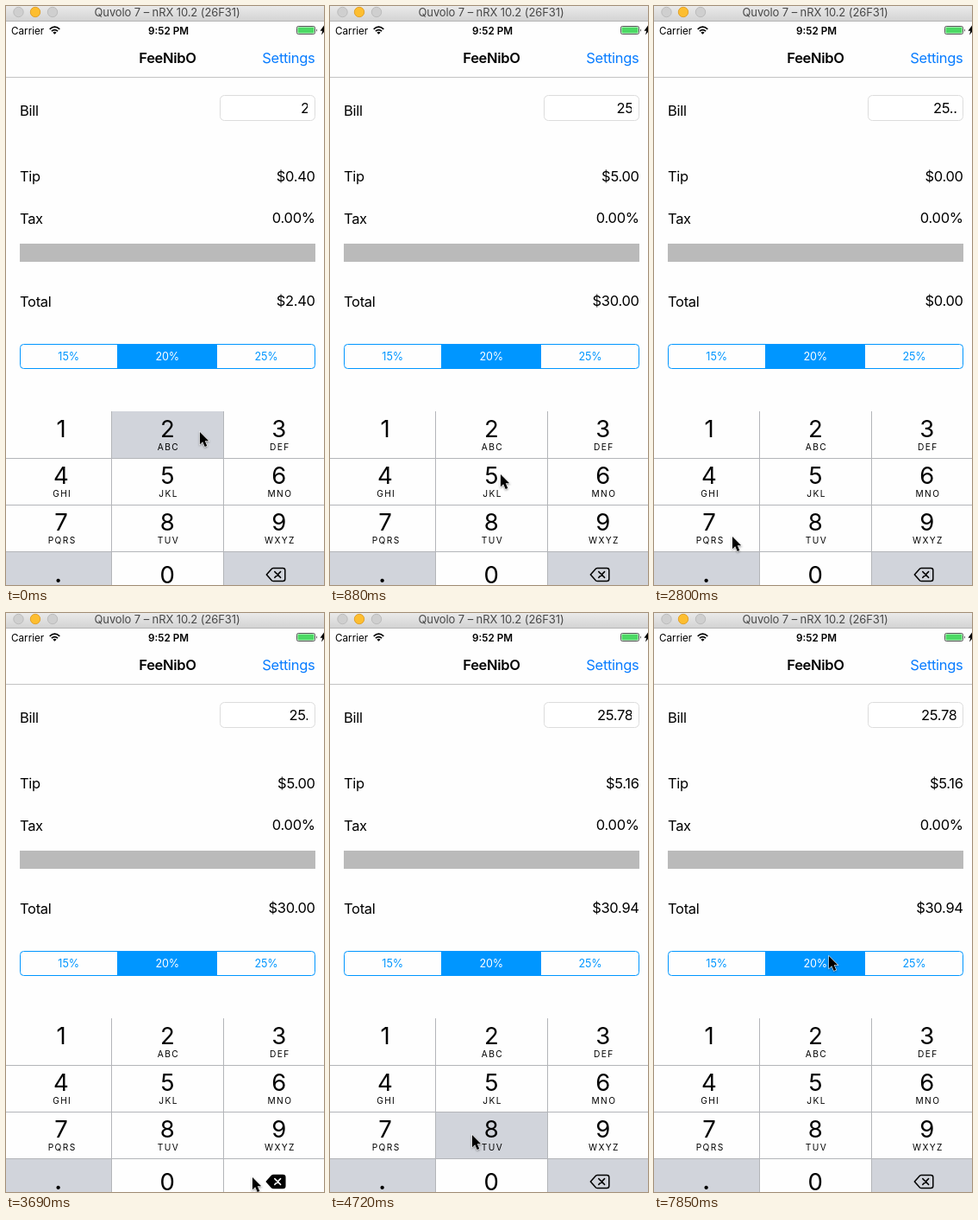
An HTML page for the animation above (8 s loop, 369x670 px).

```html
<!DOCTYPE html>
<html lang="en">
<head>
<meta charset="utf-8">
<title>Tip calculator</title>
<style>
  html, body { margin: 0; width: 100%; height: 100%; overflow: hidden; background: #fefefe; }
  svg { display: block; }
  text { font: 16.5px Inter, "Open Sans", sans-serif; letter-spacing: -.3px; white-space: pre; }
  .end { text-anchor: end; }
  .mid, .digit, .letters, .seg { text-anchor: middle; }
  .bar { font-size: 13px; letter-spacing: -.1px; fill: #474747; }
  .status { font-size: 11.7px; letter-spacing: 0; }
  .bold { font-weight: 600; }
  .seg { font-size: 12.6px; letter-spacing: -.1px; fill: #0096ff; }
  .digit { font-size: 27.5px; letter-spacing: 0; }
  .letters { font-size: 10.2px; letter-spacing: 1.4px; }
  #arrow { filter: drop-shadow(0 1px 1px #0006); }
</style>
</head>
<body>
<svg width="369" height="670" viewBox="0 0 369 670">
  <defs>
    <linearGradient id="chrome" x2="0" y2="1">
      <stop stop-color="#eaeaea"/><stop offset="1" stop-color="#d2d2d2"/>
    </linearGradient>
  </defs>

  <!-- window bar -->
  <rect width="369" height="18" fill="url(#chrome)"/>
  <path d="M0 17.5H369" stroke="#b5b5b5"/>
  <g fill="#cfcfcf" stroke="#bcbcbc">
    <circle cx="14.5" cy="7" r="5.7"/>
    <circle cx="34" cy="7" r="5.7" fill="#fdbe30" stroke="#e2a22c"/>
    <circle cx="54" cy="7" r="5.7"/>
  </g>
  <text class="bar mid" x="187" y="12">Quvolo 7 – nRX 10.2 (26F31)</text>

  <!-- status bar -->
  <text class="status" x="6" y="32.5">Carrier</text>
  <g fill="none" stroke="#000" stroke-width="1.7">
    <path d="M50.7 26.8Q56.5 21.6 62.3 26.8M52.9 29.2Q56.5 26 60.1 29.2"/>
    <path d="M56.5 32.8L54.4 30.7Q56.5 29 58.6 30.7Z" fill="#000" stroke="none"/>
  </g>
  <text class="status bold mid" x="188.5" y="32.5">9:52 PM</text>
  <rect x="337.5" y="23.5" width="21" height="9" rx="1.8" fill="#fff" stroke="#555"/>
  <rect x="338.5" y="24.5" width="19" height="7" rx="1" fill="#4cd964"/>
  <path d="M360 26.3q1.6 1.7 0 3.6z"/>
  <path d="M369 22.5L364.5 28.8H367.2L366 33.5L369 30Z"/>

  <!-- navigation -->
  <text class="bold mid" x="187.5" y="66">FeeNibO</text>
  <text class="end" x="358.5" y="66" fill="#087cff">Settings</text>
  <path d="M0 82.5H369" stroke="#c4c4c4"/>

  <!-- form -->
  <text x="16" y="126.5">Bill</text>
  <text x="16" y="202.5">Tip</text>
  <text x="16" y="251.5">Tax</text>
  <text x="16" y="347.5">Total</text>
  <rect x="248.5" y="103.5" width="110" height="29" rx="5" fill="#fff" stroke="#dcdcdc"/>
  <text class="end" id="bill" x="351.7" y="124"></text>
  <rect id="caret" x="350" y="109" width="2" height="18" fill="#fff"/>
  <text class="end" id="tip" x="358.7" y="202.5"></text>
  <text class="end" x="358.7" y="250.5">0.00%</text>
  <rect x="16" y="275" width="343" height="21" fill="#bababa"/>
  <text class="end" id="total" x="358.7" y="347"></text>

  <rect x="16.5" y="391.5" width="342" height="28" rx="4" fill="none" stroke="#0096ff"/>
  <rect x="129" y="391" width="116" height="29" fill="#0096ff"/>
  <text class="seg" x="72.7" y="410">15%</text>
  <text class="seg" x="187.3" y="410" style="fill:#fff">20%</text>
  <text class="seg" x="302" y="410">25%</text>

  <g id="pad"></g>
  <path d="M0 523.5H369M0 577.5H369M0 631.5H369M122.5 469V670M252.5 469V670" stroke="#b3b5b9"/>
  <g id="erase" stroke="#000" stroke-width="1.5" stroke-linejoin="round" stroke-linecap="round">
    <path d="M302.3 658L308.6 651Q309.3 650.4 310.3 650.4H321.3Q323.8 650.4 323.8 652.9V663.1Q323.8 665.6 321.3 665.6H310.3Q309.3 665.6 308.6 665Z"/>
    <path id="cross" d="M311.8 654.6L318.6 661.4M318.6 654.6L311.8 661.4"/>
  </g>

  <path id="arrow" d="M0 0V14.2L3.2 11.2L5.7 17L8.3 15.9L5.8 10.2H10.2Z" stroke="#fff" stroke-width="1.1" paint-order="stroke"/>
</svg>
<script>
const $ = id => document.getElementById(id);
const LOOP = 8000, STEP = 147.8;
const WHITE = "#fefefe", GREY = "#d1d4db";

// Keypad
const labels = ["", "ABC", "DEF", "GHI", "JKL", "MNO", "PQRS", "TUV", "WXYZ"];
const left = [0, 123, 253, 369], centre = [64, 187.3, 316.7];
const keys = [..."123456789.0<"];

$("pad").innerHTML = keys.map((key, i) => {
  const col = i % 3, y = 469 + 54 * Math.floor(i / 3);
  const cx = key === "." ? 60.7 : centre[col];
  const base = y + (i < 9 ? 30 : key === "." ? 36 : 199 - 162 + .5 - 1);
  const weight = key === "." ? 600 : 400;
  return `<rect id="key${i}" x="${left[col]}" y="${y}" width="${left[col + 1] - left[col]}" height="55"/>` +
    (key === "<" ? "" : `<text class="digit" x="${cx}" y="${base}" font-weight="${weight}" style="font-weight:${weight}">${key}</text>`) +
    (labels[i] ? `<text class="letters" x="${cx + 1.2}" y="${y + 45}">${labels[i]}</text>` : "");
}).join("");

// Timeline, counted in steps
const presses = [[0, "2"], [4, "5"], [9, "."], [12, "."], [25, "<"], [29, "7"], [32, "8"]];
const caretOff = [[17, 21], [37, 40], [43, 46], [50, 53]];
const path = [
  [0, 225, 493], [1, 225, 493], [4, 198, 542], [6, 198, 542], [8, 45, 651],
  [13, 45, 651], [16, 89, 614], [19, 91, 614], [20, 91, 614], [24, 286, 653],
  [26, 286, 653], [28, 95, 606], [30, 95, 606], [32, 165, 604], [39, 165, 604],
  [44, 203, 397], [99, 203, 397]
];

function pointer(n) {
  const i = path.findIndex(p => p[0] > n);
  const [n0, x0, y0] = path[i - 1], [n1, x1, y1] = path[i];
  const u = (n - n0) / (n1 - n0), e = u * u * (3 - 2 * u);
  return [x0 + (x1 - x0) * e, y0 + (y1 - y0) * e];
}

function caretOpacity(n) {
  const gap = caretOff.find(([a, b]) => n >= a && n <= b);
  return !gap ? 1 : gap.includes(n) ? .4 : 0;
}

function draw(n) {
  let bill = "", down = "";
  for (const [at, key] of presses) {
    if (at > n) break;
    bill = key === "<" ? bill.slice(0, -1) : bill + key;
    if (at === n) down = key;
  }
  const amount = Number(bill) || 0;
  $("bill").textContent = bill;
  $("tip").textContent = "$" + (amount * .2).toFixed(2);
  $("total").textContent = "$" + (amount * 1.2).toFixed(2);
  $("caret").setAttribute("opacity", caretOpacity(n));

  keys.forEach((key, i) => {
    const special = key === "." || key === "<";
    $("key" + i).setAttribute("fill", special !== (key === down) ? GREY : WHITE);
  });
  $("erase").setAttribute("fill", down === "<" ? "#000" : "none");
  $("cross").setAttribute("stroke", down === "<" ? "#fff" : "#000");
  $("arrow").setAttribute("transform", `translate(${pointer(n)})`);
}

function tick() {
  draw(Math.floor((performance.now() % LOOP + 10) / STEP));
  requestAnimationFrame(tick);
}
tick();
</script>
</body>
</html>
```
